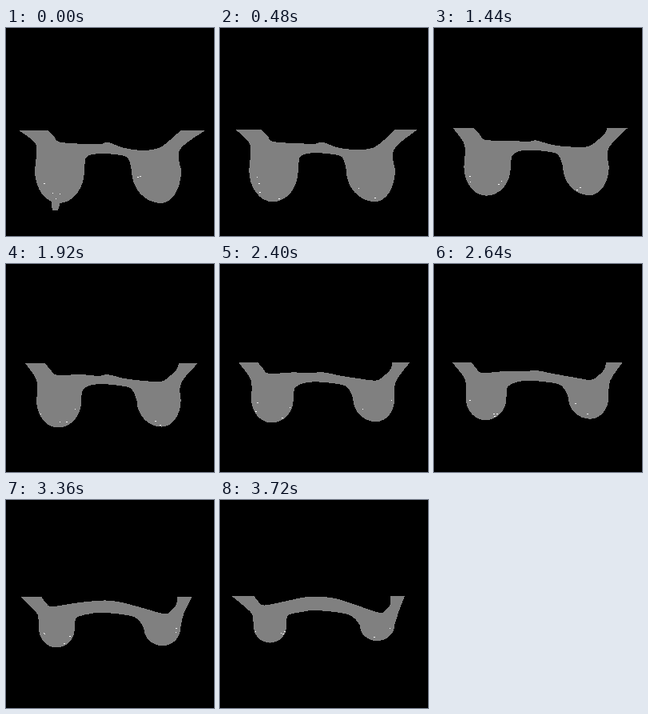
Recreate the animation shown at these times as an HTML page. Size 260 px wide and 260 px high, loop 3.84 s.

```html
<!DOCTYPE html>
<html lang="en">
<head>
<meta charset="utf-8">
<title>Sagging band</title>
<style>
html, body { margin: 0; width: 100%; height: 100%; overflow: hidden; background: #000; }
svg { display: block; width: 100%; height: 100%; }
</style>
</head>
<body>
<svg viewBox="0 0 260 260" shape-rendering="crispEdges">
  <path id="band" fill="#808080"/>
  <path id="drip" fill="#808080"/>
  <path id="specks" fill="#fff"/>
</svg>
<script>
const STEP = 120, STEPS = 32;
const EASE = 1.55, LATE = 2, LATEST = 2.3;

const $ = id => document.getElementById(id);
const band = $('band'), drip = $('drip'), specks = $('specks');

// Smooth open curve; the pen is already at the first point.
function curve(points) {
  const at = n => points[Math.max(0, Math.min(points.length - 1, n))];
  let d = '';
  for (let n = 0; n < points.length - 1; n++) {
    const [a, b, c, e] = [at(n - 1), at(n), at(n + 1), at(n + 2)];
    const out = b.map((v, k) => v + (c[k] - a[k]) / 6);
    const into = c.map((v, k) => v - (e[k] - b[k]) / 6);
    d += 'C' + [...out, ...into, ...c].map(v => v.toFixed(2)).join(' ');
  }
  return d;
}

// Quarter ellipse between a lobe's side and its lowest point.
function quarter(from, to) {
  const rx = Math.abs(to[0] - from[0]), ry = Math.abs(to[1] - from[1]);
  return `A${rx} ${ry} 0 0 1 ${to}`;
}

// Lower half of a lobe, clockwise.
function belly({ outer, low, inner }) {
  return quarter(outer, low) + quarter(low, inner);
}

function random(seed) {
  const v = Math.sin(seed * 12.9898) * 43758.5453;
  return v - Math.floor(v);
}

function speckPath(step, lobes) {
  let d = '';
  for (let n = 0; n < 6; n++) {
    const r = k => random(step * 31 + n * 5 + k + 1);
    const { outer, low, inner } = lobes[n % 3 ? 0 : 1];
    const angle = r(0) * Math.PI, reach = 0.7 + 0.25 * r(1);
    const x = (outer[0] + inner[0]) / 2 + Math.cos(angle) * reach * Math.abs(inner[0] - outer[0]) / 2;
    const y = outer[1] + Math.sin(angle) * reach * (low[1] - outer[1]);
    const w = r(2) < 0.5 ? 1 : 2;
    d += `M${Math.round(x)} ${Math.round(y)}h${w}v1h${-w}z`;
  }
  return d;
}

function draw(step) {
  const t = step / (STEPS - 1);
  const go = (a, b, power = EASE) => a + (b - a) * t ** power;
  const move = (x0, y0, x1, y1, power) => [go(x0, x1, power), go(y0, y1, power)];

  const top = 128 - step / 4;
  const tipLeft = [16 - t + 34 * t * (1 - t), top];
  const notchLeft = [go(52, 43), top];
  const notchRight = [go(219, 213, 1), top];
  const tipRight = [go(249, 231, 1), top];

  const left = {
    outer: move(98, 178, 83, 158, LATE),
    low: move(66, 219, 62.5, 178.5),
    inner: move(36, 178, 42, 158)
  };
  const right = {
    outer: move(219, 178, 218, 157),
    low: move(194, 219, 196, 176),
    inner: move(157, 178, 175, 157)
  };

  const brow = [
    notchLeft,
    move(60, 135, 48, 127),
    move(67, 142.5, 56, 131.5),
    move(100, 145, 84, 126),
    move(118, 145, 106, 121.5, LATEST),
    move(128, 143, 127, 121, LATEST),
    move(148, 150, 148, 124, LATE),
    move(172, 153, 178, 134),
    move(191, 150, 200, 141),
    move(205, 140, 208, 137),
    move(214, 132, 213, 130),
    notchRight
  ];
  const rightArm = [tipRight, move(217.5, 152, 224, 138, LATEST), right.outer];
  const bridge = [
    right.inner,
    move(154, 166, 168, 148),
    move(148, 160, 156, 142),
    move(124, 157, 120, 138),
    move(108, 158, 102, 140),
    move(101, 161, 87, 143, LATE),
    move(99, 166, 83.5, 148, LATE),
    left.outer
  ];
  const leftArm = [left.inner, move(38, 156, 41, 149), move(36, 143, 38, 140), tipLeft];

  band.setAttribute('d',
    `M${tipLeft}L${notchLeft}` + curve(brow) +
    `L${tipRight}` + curve(rightArm) + belly(right) +
    curve(bridge) + belly(left) + curve(leftArm) + 'Z');

  // The drip is drawn back into the left lobe within the first few steps.
  const tip = 228 - 3 * step;
  drip.setAttribute('d', step < 4 ? `M57 ${tip - 12}V${tip - 6}L58 ${tip}H65L67 ${tip - 6}V${tip - 12}Z` : '');

  specks.setAttribute('d', speckPath(step, [left, right]));
}

function tick(now) {
  draw(Math.floor(now / STEP) % STEPS);
  requestAnimationFrame(tick);
}
draw(0);
requestAnimationFrame(tick);
</script>
</body>
</html>
```
